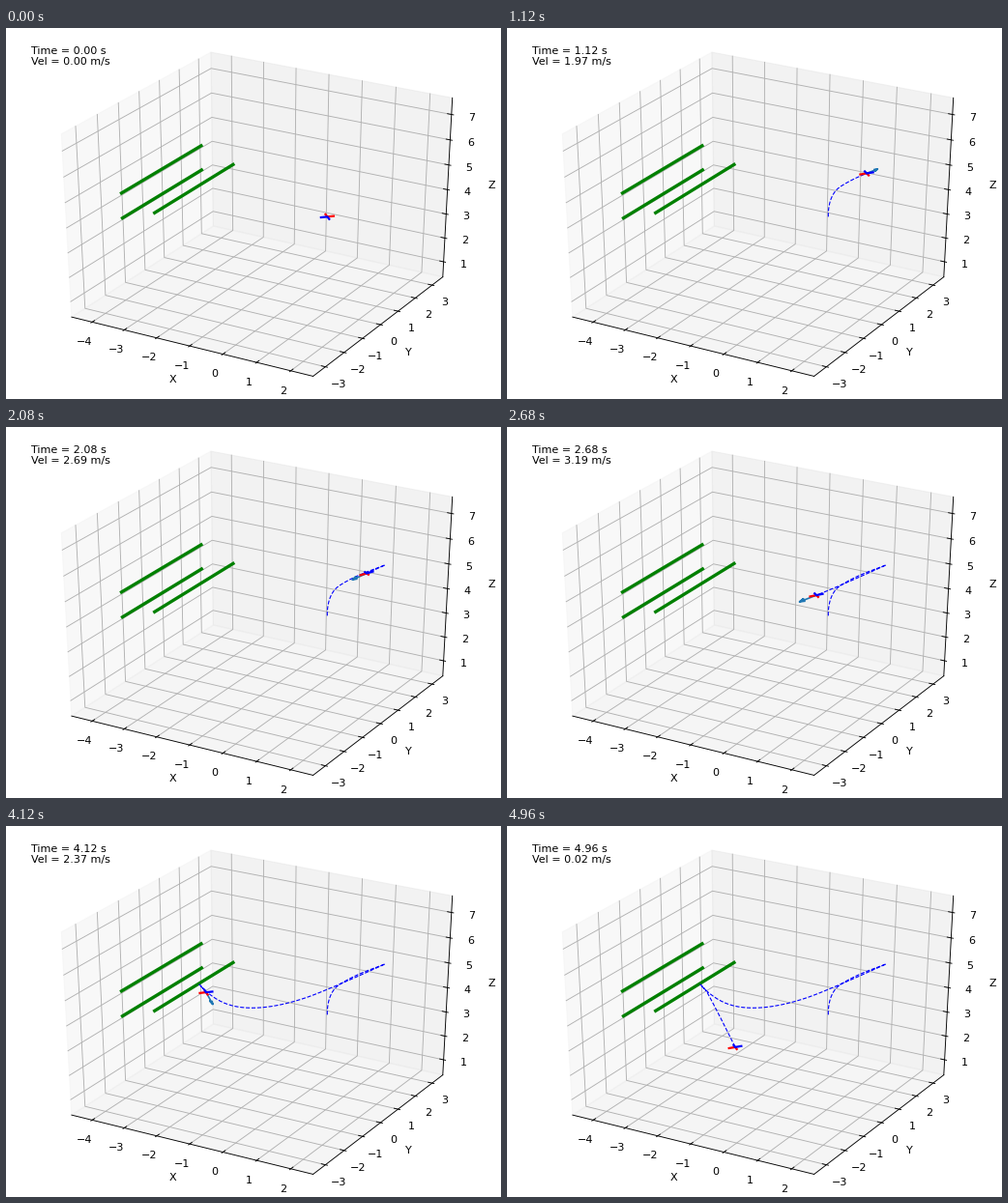
A matplotlib script for the animation above (5000 ms loop, 512x384 px).

```python
import numpy as np
import matplotlib.pyplot as plt
from matplotlib.animation import FuncAnimation
from matplotlib.patches import Polygon

FRAMES, STEP = 125, 0.04
CENTER = np.array([-1.0, 0.0, 4.0])   # middle of the plotted volume
SPAN = 7.0                            # same extent on every axis
H = 0.5 + 1 / 48                      # half size of the drawn box
DELTA = 1 / 12
PER_POINT = 48 / (72 * (6.4 + 4.8)) * DELTA
ARM = 0.12
ARROW = 0.2

# camera: elevation 30, azimuth -60, distance 10
ELEV, AZIM, DIST = np.radians(30), np.radians(-60), 10
TOWARD = np.array([np.cos(AZIM) * np.cos(ELEV),
                   np.sin(AZIM) * np.cos(ELEV), np.sin(ELEV)])
RIGHT = np.array([-np.sin(AZIM), np.cos(AZIM), 0])
UP = np.cross(TOWARD, RIGHT)


def project_box(pts):
    """Perspective view of points in box units (-0.5 to 0.5)."""
    pts = np.asarray(pts, float)
    depth = DIST - pts @ TOWARD
    return np.array([pts @ RIGHT / depth, pts @ UP / depth])


def project(pts):
    return project_box((np.asarray(pts, float) - CENTER) / SPAN)


fig = plt.figure(figsize=(6.4, 4.8), dpi=80, facecolor="white")
ax = fig.add_axes([0, 0, 1, 1])
ax.set_xlim(-0.095, 0.09)
ax.set_ylim(-0.095, 0.09)
ax.axis("off")


def box_line(pts, **style):
    ax.plot(*project_box(pts), **style)


def box_text(pos, text, **style):
    ax.text(*project_box(pos), text, ha="center", fontsize=10, **style)


def draw_panes():
    panes = [
        (0.95, [(-H, -H, -H), (-H, H, -H), (-H, H, H), (-H, -H, H)]),
        (0.90, [(-H, H, -H), (H, H, -H), (H, H, H), (-H, H, H)]),
        (0.925, [(-H, -H, -H), (H, -H, -H), (H, H, -H), (-H, H, -H)]),
    ]
    for grey, corners in panes:
        ax.add_patch(Polygon(project_box(corners).T, color=(grey,) * 3,
                             alpha=0.5, lw=1, zorder=0))


def draw_axis(name, index, edge, tick_dir, grid, values):
    """One axis: edge line, ticks, labels and grid lines on two walls."""
    edge = np.array(edge, float)
    out = np.sign(edge)
    ends = np.array([edge, edge])
    ends[:, index] = -H, H
    box_line(ends, color="black", lw=0.8, zorder=2)

    label = edge + out * 25 * PER_POINT
    box_text(label, name, va="center")

    for value in values:
        t = (value - CENTER[index]) / SPAN
        wall = np.array(grid, float)
        wall[:, index] = t
        box_line(wall, color="#b0b0b0", lw=0.8, zorder=1)

        tick = np.array([edge, edge])
        tick[:, index] = t
        tick[:, tick_dir] += out[tick_dir] * DELTA * np.array([0.1, -0.2])
        box_line(tick, color="black", lw=0.8, zorder=2)

        pos = edge + out * 11.5 * PER_POINT
        pos[index] = t
        box_text(pos, str(value).replace("-", "\u2212"), va="top")


draw_panes()
draw_axis("X", 0, (0, -H, -H), 1,
          [(0, -H, -H), (0, H, -H), (0, H, H)], range(-4, 3))
draw_axis("Y", 1, (H, 0, -H), 0,
          [(H, 0, -H), (-H, 0, -H), (-H, 0, H)], range(-3, 4))
draw_axis("Z", 2, (H, H, 0), 0,
          [(-H, -H, 0), (-H, H, 0), (H, H, 0)], range(1, 8))

for x, z in [(-4, 4.75), (-4, 3.75), (-3, 4.25)]:
    ax.plot(*project([(x, -2, z), (x, 2, z)]), color="green", lw=3, zorder=3)

# flight plan in the x-z plane: time, x, z, vx, vz
KNOTS = np.array([
    (0.00, 1.00, 4.25, 0.00, 0.00),
    (0.68, 1.338, 5.54, 1.75, 2.03),
    (1.52, 2.573, 6.65, 0.90, 0.76),
    (1.62, 2.62, 6.69, 0.00, 0.00),
    (2.68, 0.639, 4.96, -2.47, -2.02),
    (3.48, -2.11, 3.83, -3.18, 0.91),
    (3.90, -2.86, 4.36, 0.00, 0.00),
    (4.12, -2.65, 4.10, 1.01, -2.14),
    (4.96, -1.80, 2.10, 0.01, -0.015),
])


def flight(t):
    """Position and velocity from cubic Hermite pieces."""
    t = np.clip(t, 0, KNOTS[-1, 0])
    k = np.clip(np.searchsorted(KNOTS[:, 0], t + 1e-9) - 1, 0, len(KNOTS) - 2)
    a, b = KNOTS[k], KNOTS[k + 1]
    span = b[0] - a[0]
    s = (t - a[0]) / span
    p0, p1, m0, m1 = a[1:3], b[1:3], a[3:] * span, b[3:] * span
    c2 = 3 * (p1 - p0) - 2 * m0 - m1
    c3 = 2 * (p0 - p1) + m0 + m1
    pos = p0 + s * (m0 + s * (c2 + s * c3))
    vel = (m0 + s * (2 * c2 + s * 3 * c3)) / span
    return np.array([pos[0], 0, pos[1]]), np.array([vel[0], 0, vel[1]])


def body_axes(t):
    """Tilt follows the thrust; the heading turns half round at take-off."""
    accel = (flight(t + 0.1)[1] - flight(t - 0.1)[1]) / 0.2
    thrust = accel + (0, 0, 9.81)
    thrust /= np.linalg.norm(thrust)
    s = np.clip(t / 0.6, 0, 1)
    yaw = np.pi / 2 + np.pi * s * s * (3 - 2 * s)
    side = np.cross(thrust, (np.cos(yaw), np.sin(yaw), 0))
    side /= np.linalg.norm(side)
    return np.cross(side, thrust), side


def turned(v, degrees):
    c, s = np.cos(np.radians(degrees)), np.sin(np.radians(degrees))
    return np.array([c * v[0] - s * v[2], 0, s * v[0] + c * v[2]])


TRACK = np.array([flight(i * STEP)[0] for i in range(FRAMES)])

path, = ax.plot([], [], "b--", lw=1, zorder=4)
arrow, = ax.plot([], [], color="C0", lw=1.5, zorder=5,
                 solid_capstyle="butt")
front, = ax.plot([], [], color="red", lw=2, zorder=6)
rear, = ax.plot([], [], color="blue", lw=2, zorder=6)
clock = ax.text(0.05, 0.93, "", transform=ax.transAxes, fontsize=10)
speed = ax.text(0.05, 0.90, "", transform=ax.transAxes, fontsize=10)


def update(i):
    t = i * STEP
    pos, vel = flight(t)
    path.set_data(*project(TRACK[:i + 1]))

    shaft = vel * ARROW
    tip = pos + shaft
    if np.linalg.norm(vel) > 0.1:
        barbs = [tip - 0.3 * turned(shaft, a) for a in (15, -15)]
        arrow.set_data(*project([pos, tip, barbs[0], tip, barbs[1]]))
    else:
        arrow.set_data([], [])

    ahead, side = body_axes(t)
    for line, sign in ((front, 1), (rear, -1)):
        tips = [pos + ARM * (sign * ahead + k * side) for k in (1, -1)]
        line.set_data(*project([tips[0], pos, tips[1]]))

    clock.set_text(f"Time = {t:.2f} s")
    speed.set_text(f"Vel = {np.linalg.norm(vel):.2f} m/s")
    return path, arrow, front, rear, clock, speed


anim = FuncAnimation(fig, update, frames=FRAMES, interval=40,
                     repeat=True, repeat_delay=0)
plt.show()
```
